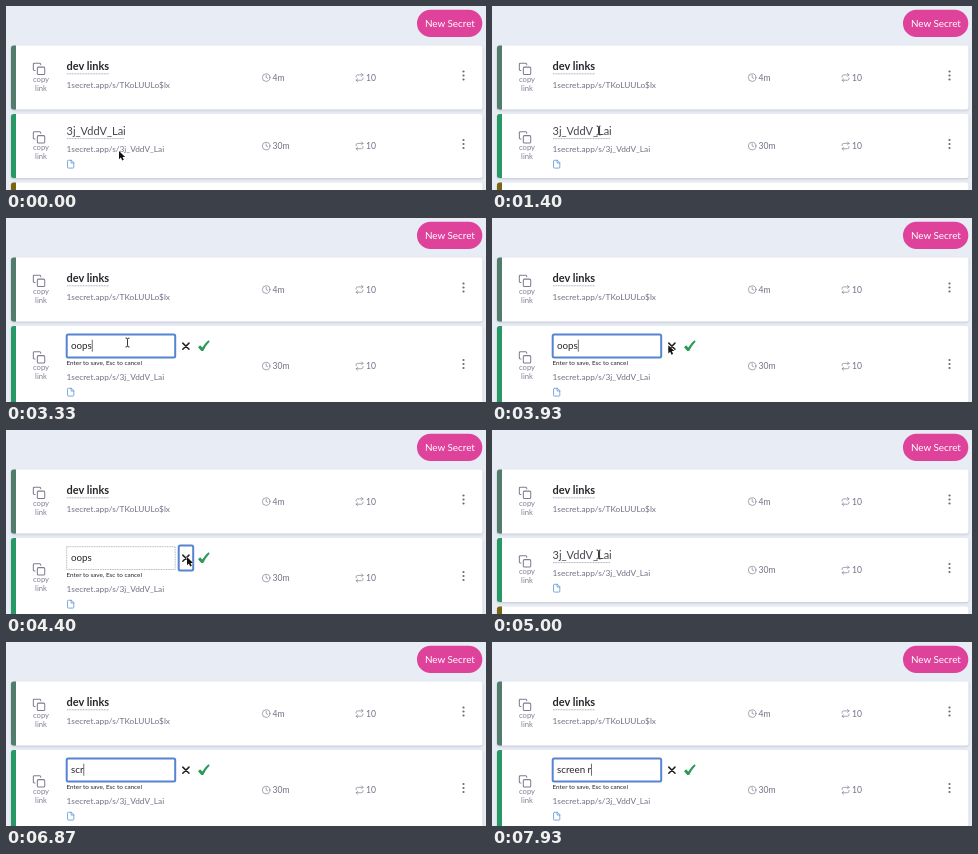
Recreate the animation shown at these times as an HTML page. Size 480x184 px, loop 8000 ms.

```html
<!DOCTYPE html>
<html lang="en">
<head>
<meta charset="utf-8">
<title>Rename a secret</title>
<style>
  html, body { margin: 0; width: 100%; height: 100%; overflow: hidden; background: #e8ecf4; }
  svg { display: block; width: 100vw; height: 100vh; }
  text { font-family: Lato, sans-serif; white-space: pre; }
  .card { filter: drop-shadow(0 1px 1px rgba(40, 50, 80, .2)); }
  .icon { fill: none; stroke: #7c7c90; stroke-width: 1.8; stroke-linecap: round; stroke-linejoin: round; }
</style>
</head>
<body>
<svg id="stage" viewBox="0 0 480 184"></svg>
<script>
const FPS = 15, LOOP = 8000;
const GREY = '#717186', PALE = '#828296', INK = '#26262c', BLUE = '#5584d2';
const EDIT_GROWTH = 16;
const INPUT_SIZE = 9.8;
const stage = document.getElementById('stage');
const measure = document.createElement('canvas').getContext('2d');
measure.font = `${INPUT_SIZE}px Lato, sans-serif`;

const ICONS = {
  copy: '<rect x="9" y="9" width="13" height="13" rx="2"/><path d="M5 15H4a2 2 0 0 1-2-2V4a2 2 0 0 1 2-2h9a2 2 0 0 1 2 2v1"/>',
  clock: '<circle cx="12" cy="12" r="10"/><path d="M12 6v6l4 2"/>',
  repeat: '<path d="M17 1l4 4-4 4M3 11V9a4 4 0 0 1 4-4h14M7 23l-4-4 4-4M21 13v2a4 4 0 0 1-4 4H3"/>',
  file: '<path d="M13 2H6a2 2 0 0 0-2 2v16a2 2 0 0 0 2 2h12a2 2 0 0 0 2-2V9zM13 2v7h7"/>'
};

// Input contents: [frame, text, selected]
const TYPING = [
  [22, '3j_VddV_Lai', true], [35, 'o'], [38, 'oo'], [40, 'oop'], [44, 'oops'],
  [91, 'oops', true], [98, 's'], [100, 'sc'], [103, 'scr'], [108, 'scre'],
  [111, 'scree'], [115, 'screen'], [117, 'screen '], [119, 'screen r']
];

// Pointer path: [frame, x, y]
const POINTER = [
  [0, 113, 145], [8, 103.5, 130], [16, 103.5, 130], [18, 106.5, 124.5], [49, 106.5, 124.5],
  [50, 121.5, 124.5], [55, 168, 127.5], [57, 168, 127.5], [62, 181, 127], [71, 181, 127],
  [75, 106.5, 124.5], [120, 106.5, 124.5]
];

const text = (x, y, size, str, fill = GREY, extra = '') =>
  `<text x="${x}" y="${y}" font-size="${size}" fill="${fill}" ${extra}>${str}</text>`;
const rect = (x, y, w, h, extra) => `<rect x="${x}" y="${y}" width="${w}" height="${h}" ${extra}/>`;
const icon = (name, x, y, scale, extra = '') =>
  `<g class="icon" transform="translate(${x} ${y}) scale(${scale})" ${extra}>${ICONS[name]}</g>`;

function card(top, height, color) {
  const side = height - 5;
  return `<g class="card">
    <path fill="${color}" d="M10 ${top}H7.5a2.5 2.5 0 0 0-2.5 2.5v${side}a2.5 2.5 0 0 0 2.5 2.5H10z"/>
    <path fill="#fff" d="M10 ${top}H474a2.5 2.5 0 0 1 2.5 2.5v${side}a2.5 2.5 0 0 1-2.5 2.5H10z"/></g>`;
}

function rowTools(middle, life) {
  const dots = [-6, -2, 2].map(d => `<circle cx="457.5" cy="${middle + d}" r="1.1" fill="#66667a"/>`).join('');
  return icon('copy', 26.2, middle - 15.5, .57) +
    text(35, middle + 4.2, 7.7, 'copy', PALE, 'text-anchor="middle"') +
    text(35, middle + 13.2, 7.7, 'link', PALE, 'text-anchor="middle"') +
    icon('clock', 255.6, middle - 4.5, .38) + text(266.5, middle + 3, 8.6, life) +
    icon('repeat', 349, middle - 4.5, .38) + text(360, middle + 3, 8.6, '10') + dots;
}

function title(y, str, width, size, extra, fill) {
  return text(60.5, y, size, str, fill, extra) +
    `<path d="M61 ${y + 3.6}h${width}" stroke="#9898a6" stroke-width=".8" stroke-dasharray="1 .6"/>`;
}

function editor(frame) {
  const [, value, selected] = TYPING.filter(step => step[0] <= frame).pop();
  const closing = frame >= 62 && frame < 67;
  const width = measure.measureText(value).width;
  const ring = `rx="1.5" fill="#fff" stroke="${BLUE}" stroke-width="2"`;
  const plain = 'fill="#fff" stroke="#a3a3ad" stroke-width=".8" stroke-dasharray="1 .7"';
  let out = closing ? rect(60.7, 116.7, 108.5, 22.8, plain) + rect(172.7, 115.5, 14.5, 25, ring)
                    : rect(60.7, 116.4, 108.5, 23, ring);
  if (selected) out += rect(65, 121.5, width, 12.5, 'fill="#aecff7"');
  else if (!closing) out += rect(65 + width, 121.7, .7, 12, 'fill="#333"');
  return out + text(65, 131.2, INPUT_SIZE, value, INK) +
    '<path d="M176.8 125.1l6.2 6.2m0-6.2l-6.2 6.2" stroke="#222" stroke-width="1.5" stroke-linecap="round"/>' +
    '<path d="M192 129.2l2.1-2 2.2 2.4q2.7-4.8 6.2-7.4l1.2 1.2q-3.9 4-6.5 9.6h-1.9z" fill="#2d9b57"/>' +
    text(60.5, 146.9, 6.35, 'Enter to save, Esc to cancel', INK);
}

function pointer(frame, editing) {
  if ((frame >= 35 && frame < 50) || frame >= 98) return '';
  const next = POINTER.findIndex(key => key[0] > frame);
  const [f0, x0, y0] = POINTER[next - 1], [f1, x1, y1] = POINTER[next];
  const ease = 1 - (1 - (frame - f0) / (f1 - f0)) ** 2;
  const x = x0 + (x1 - x0) * ease, y = y0 + (y1 - y0) * ease;
  const overText = editing ? x < 170 : x < 119 && y < 133;
  const shape = overText
    ? '<path d="M-2-4.5q2 0 2 1.2 0-1.2 2-1.2M0-3.3v6.6M-2 4.5q2 0 2-1.2 0 1.2 2 1.2" fill="none" stroke="#222" stroke-width=".9"/>'
    : '<path d="M0 0v8.2l1.9-1.7 1.3 3 1.6-.7-1.3-2.9h2.6z" fill="#111" stroke="#fff" stroke-width=".8" paint-order="stroke"/>';
  return `<g transform="translate(${x} ${y})">${shape}</g>`;
}

function draw(frame) {
  const editing = (frame >= 22 && frame < 67) || frame >= 91;
  const grow = editing ? EDIT_GROWTH : 0;
  stage.innerHTML =
    rect(0, 0, 480, 184, 'fill="#e8ecf4"') +
    rect(411, 3.8, 65.3, 27.2, 'rx="13.6" fill="#df429b"') +
    text(443.9, 20.8, 9.9, 'New Secret', '#fff', 'text-anchor="middle"') +
    card(39.5, 64, '#527d6c') + rowTools(71.5, '4m') +
    title(64.2, 'dev links', 42, 11, 'font-weight="700"', INK) +
    text(60.5, 82, 8.3, '1secret.app/s/TKoLUULo$lx') +
    card(108, 64 + grow, '#289966') + rowTools(140 + grow / 2, '30m') +
    (editing ? editor(frame) : title(129, '3j_VddV_Lai', 57, 11, '', '#45454f')) +
    text(60.5, 146 + grow, 8.3, '1secret.app/s/3j_VddV_Lai') +
    icon('file', 60, 153.5 + grow, .39, 'style="stroke:#4587cf"') +
    card(176.5 + grow, 64, '#796410') +
    pointer(frame, editing);
}

let shown = -1;
function tick() {
  const frame = Math.floor((performance.now() % LOOP) * FPS / 1000 + .06) % (LOOP * FPS / 1000);
  if (frame !== shown) draw(shown = frame);
  requestAnimationFrame(tick);
}
tick();
</script>
</body>
</html>
```
